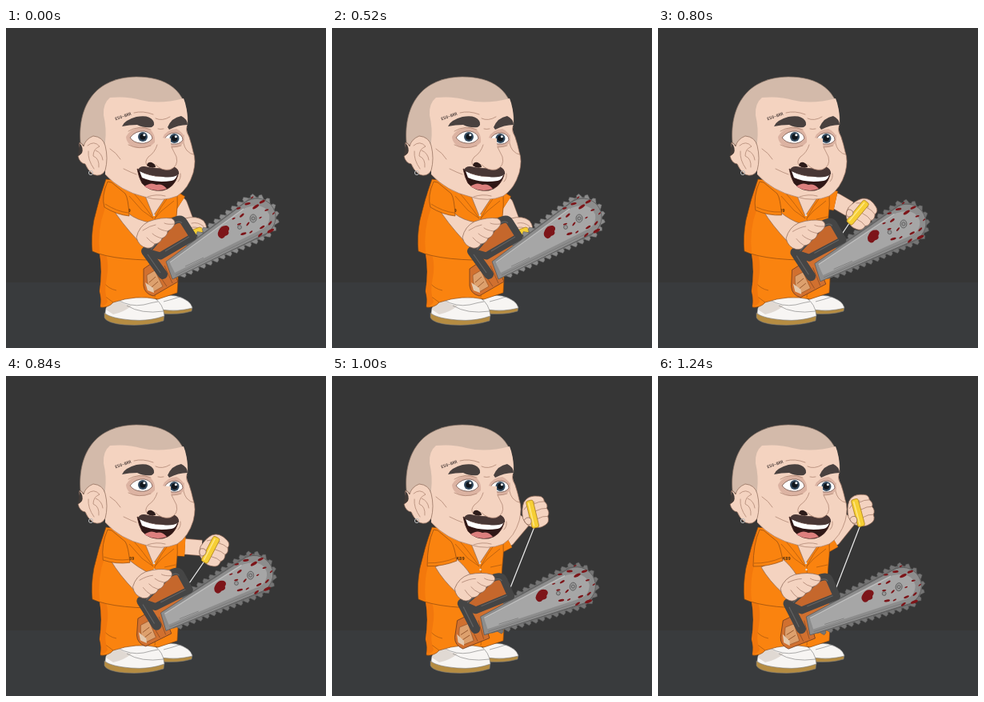
An HTML page that plays this animation: 400 by 400 pixels, repeating every 1280 ms.

```html
<!DOCTYPE html>
<html lang="en">
<head>
<meta charset="utf-8">
<title>Chainsaw pull start</title>
<style>
html, body { margin: 0; width: 100%; height: 100%; overflow: hidden; background: #363636; }
svg { display: block; width: 100vw; height: 100vh; }
text { font-family: "DejaVu Sans Mono", monospace; font-weight: bold; }
.skin { fill: #f4d3c0; stroke: #8a6655; stroke-width: .7; }
.cloth { fill: #fa830f; stroke: #8f4a10; stroke-width: .7; }
.fold { fill: none; stroke: #a8570f; stroke-width: .7; }
.crease { fill: none; stroke: #a67d6b; stroke-width: .7; stroke-linecap: round; }
.dark { fill: none; stroke: #454545; stroke-linejoin: round; stroke-linecap: round; }
.line { fill: none; stroke-linejoin: round; }
</style>
</head>
<body>
<svg viewBox="0 0 400 400" preserveAspectRatio="none">
  <rect width="400" height="400" fill="#363636"/>
  <rect y="318" width="400" height="82" fill="#393b3d"/>

  <!-- far shoe, near shoe, trousers -->
  <g stroke="#777" stroke-width=".6">
    <path d="M184 347 Q206 354 233 349 L232 354 Q216 359 194 357Z" fill="#b58c42"/>
    <path d="M186 341 Q198 332 213 335 Q231 340 233 350 Q215 355 193 352Z" fill="#f7f5f3"/>
    <path d="M197 342 Q209 339 217 336" fill="none"/>
    <path d="M123 356 Q150 367 198 358 L197 366 Q176 373 148 371 Q126 369 123 362Z" fill="#b58c42"/>
    <path d="M124 357 Q123 345 139 338 Q163 330 185 337 Q197 345 198 360 Q179 367 156 365 Q132 363 124 357Z" fill="#f7f5f3"/>
    <path d="M125 352 Q126 345 139 339 Q146 346 157 347 Q148 355 134 358Z" fill="#e0d9d3" stroke="none"/>
    <path d="M140 340 Q155 349 172 346 Q183 343 190 342 M151 347 Q169 358 197 354" fill="none"/>
  </g>
  <path class="cloth" d="M117 280 Q121 304 117 329 Q120 339 118 349 Q128 350 134 343 Q163 333 190 339 L214 331 Q217 300 211 270Z"/>
  <path class="fold" d="M119 332 Q130 340 134 343 M122 318 Q128 326 138 328 M186 337 Q188 322 183 306"/>
  <path d="M117 282 Q121 304 117 329 Q120 339 118 348 Q125 347 127 342 Q122 330 126 312 Q129 296 125 283Z" fill="#f1770d"/>

  <!-- far arm -->
  <path class="line arm" stroke="#8a6655" stroke-width="20.4"/>
  <path class="line arm" stroke="#f4d3c0" stroke-width="19"/>
  <path class="line upper" stroke="#8f4a10" stroke-width="25.4"/>
  <path class="line upper" stroke="#fa830f" stroke-width="24"/>

  <!-- torso -->
  <path class="cloth" d="M125 189 Q116 214 110 240 Q106 262 108 279 Q136 292 213 290 Q210 262 213 236 Q215 220 214 208 L180 196Z"/>
  <path d="M124 194 Q116 216 111 240 Q107 262 109 278 L117 281 Q114 252 123 228Z" fill="#f3780c"/>
  <path class="skin" d="M172 205 L184 235 L200 211Z"/>
  <path class="fold" d="M160 207 Q170 218 184 238 L170 228 L154 210 M186 238 Q194 222 203 211 M210 216 L194 229 L186 238 Q188 262 186 288 M198 239 L212 236"/>
  <circle cx="185" cy="234" r="1.3" fill="#ddd"/><circle cx="185.5" cy="242" r="1.2" fill="#ddd"/>
  <text id="badge" x="156" y="230" font-size="5.5" fill="#51300f">K89</text>

  <line id="cord" stroke="#eee" stroke-width="1.2"/>
  <g id="restHand">
    <path class="skin" d="M224 238 Q238 234 247 241 Q253 249 249 254 Q240 260 229 257 Q222 250 224 238Z"/>
    <path class="crease" d="M232 244 Q240 242 247 248 M230 250 Q238 247 243 252"/>
    <path d="M215 259 L242 249 Q247 250 246 255 L218 266Z" fill="#f6cf35" stroke="#a87a14" stroke-width=".7"/>
  </g>

  <g id="saw">
    <path d="M172 301 L191 288 L236 261 L243 269 L203 291 L215 317 L184 335 Q173 332 172 322Z" fill="#d1702f" stroke="#703b1e" stroke-width=".8"/>
    <path d="M176 279 L207 243 L222 242 L234 261 L193 285Z" fill="#c5672c"/>
    <path d="M176 309 L186 303 L196 323 L184 330 Q176 326 176 309Z" fill="#dda06d" stroke="#8b4c24" stroke-width=".6"/>
    <path d="M179 318 L187 311 M182 324 L190 317 M186 301 L201 323 M198 297 L208 319" fill="none" stroke="#8b4c24" stroke-width=".8"/>
    <path d="M174 318 L184 325 L185 331 L177 328Z" fill="#e4c9ae"/>
    <path id="chain" class="line" d="M226 272 L302 215 A24.5 24.5 0 0 1 325 258 L216 309" stroke="#707070" stroke-width="4"/>
    <path id="teeth" stroke="#5a5a5a" stroke-width=".5"/>
    <path d="M200 292 L302 216 A23.5 23.5 0 0 1 325 257 L208 314Z" fill="#8d8d8d" stroke="#5a5a5a" stroke-width=".8"/>
    <path d="M205 294 L299 225 Q322 216 329 233 Q331 246 319 252 L211 306Z" fill="#a6a6a6"/>
    <path d="M212 309 L318 257 M224 298 L247 287" fill="none" stroke="#747474" stroke-width=".7"/>
    <path d="M205 293 L297 226" stroke="#bfbfbf" stroke-width="1.4"/>
    <g fill="#999" stroke="#5d5d5d" stroke-width=".9">
      <ellipse cx="309" cy="238" rx="4" ry="5"/><circle cx="309" cy="238" r="2"/><circle cx="292" cy="249" r="2.4"/>
    </g>
    <g id="blood" fill="#7d1519">
      <path d="M266 253 Q269 246 276 247 Q281 249 278 254 Q280 258 274 260 Q271 265 267 262 Q263 259 266 253Z"/>
    </g>
    <path class="dark" stroke-width="12" d="M175 279 L196 308"/>
    <path class="dark" stroke-width="9" d="M176 279 L207 243 Q218 236 222 242 L234 261 L193 285 L179 281"/>
    <path d="M181 277 L210 244 Q217 240 220 244 M199 279 L229 261 M177 283 L193 306" fill="none" stroke="#626262" stroke-width="1.2"/>
  </g>

  <path id="forearm" class="skin"/>
  <g id="grip">
    <path class="skin" d="M163 262 Q166 248 178 242 Q194 236 207 238 Q213 241 210 247 Q207 252 202 254 Q202 260 195 263 Q193 269 186 270 Q183 276 176 275 Q166 273 163 262Z"/>
    <path class="crease" d="M210 245 Q202 246 198 244 M202 254 Q194 253 190 250 M195 263 Q187 261 183 257 M186 270 Q180 267 176 262 M171 253 Q180 247 187 246"/>
  </g>
  <path id="sleeve" class="cloth"/>
  <path id="hem" class="fold"/>

  <g id="fist">
    <path class="skin" d="M-13 2 Q-12 -10 -7 -17 Q0 -25 13 -20 Q19 -18 18 -12 Q22 -7 19 -3 Q22 3 18 7 Q19 15 12 17 Q4 20 -1 16 Q-11 15 -13 2Z"/>
    <path class="crease" d="M4 -12 Q12 -14 18 -12 M5 -3 Q13 -5 19 -3 M5 7 Q12 5 18 7 M-9 -8 Q-2 -15 6 -14"/>
    <rect x="-4.5" y="-17.5" width="9" height="35" rx="2.5" fill="#f6cf35" stroke="#a87a14" stroke-width=".7"/>
    <path d="M-1.5 -15 V15" stroke="#ffe685" stroke-width="1.6"/>
    <path class="skin" d="M-12 5 Q-8 1 -4 4 Q-2 9 -6 12 Q-11 12 -12 5Z"/>
  </g>

  <!-- head -->
  <path d="M93 143 C90 105 105 62 163 61 C198 61 228 76 227 120 L205 175 L122 170Z" fill="#d3baaa" stroke="#8a7468" stroke-width=".7"/>
  <path d="M124 142 Q126 126 122 109 Q121 94 130 87 Q152 85 168 90 Q192 96 222 88 Q227 100 227 119 Q224 126 228 134 Q232 145 234 155 Q238 165 234 181 Q228 201 214 210 Q195 218 173 211 Q143 204 124 183Z" fill="#f4d3c0"/>
  <path class="crease" d="M226 124 Q224 129 229 136 Q232 146 234 155 Q238 165 234 181 Q228 201 214 210 Q195 218 173 211 Q143 204 124 183 M222 134 Q220 145 226 153 Q231 158 234 158 M147 176 Q157 181 163 183 M130 151 Q138 156 143 164 M215 192 Q219 188 218 182 M177 211 Q188 207 199 210"/>
  <path class="skin" d="M92 143 Q96 145 97 148 Q99 139 109 135 Q121 136 124 147 Q128 163 124 178 Q119 187 109 183 Q102 178 99 170 Q92 169 90 160 Q96 157 95 152 Q90 150 92 143Z"/>
  <path class="crease" d="M102 147 Q110 140 117 148 Q109 151 109 160 Q117 163 116 174 M103 154 Q102 165 110 176 M112 153 Q120 156 121 165"/>
  <path d="M92 144 Q97 149 95 156 L90 160Z" fill="#413a37"/>
  <circle cx="106" cy="181" r="2.6" fill="none" stroke="#bbb" stroke-width="1"/>
  <text x="137" y="115.5" font-size="5" fill="#5a4a45" transform="rotate(-19 137 115.5)">ESO-BRR</text>

  <g fill="#dcb3a2">
    <path d="M150 136 Q157 123 175 124 Q187 129 186 143 Q179 151 164 150 Q151 147 150 136Z"/>
    <path d="M196 137 Q200 127 213 126 Q223 130 223 141 Q219 150 207 149 Q196 146 196 137Z"/>
  </g>
  <g fill="#fff" stroke="#735248" stroke-width=".8">
    <path d="M155 137 Q162 128 173 129 Q182 131 183 138 Q178 145 168 144 Q159 143 155 137Z"/>
    <path d="M198 139 Q202 131 212 131 Q221 133 221 140 Q217 146 208 145 Q200 144 198 139Z"/>
  </g>
  <g id="eyes"></g>
  <path class="crease" d="M153 146 Q166 153 181 147 M199 147 Q208 151 219 147 M153 129 Q165 121 181 127 M160 106 Q171 103 184 108 M187 113 Q195 117 205 111 M190 126 Q193 127 197 126"/>
  <g fill="#49413f">
    <path d="M145 123 Q148 115 163 111 Q179 108 184 116 Q187 121 182 124 Q172 125 164 121 Q154 121 145 123Z"/>
    <path d="M202 124 Q207 112 219 110 Q227 114 227 121 Q215 121 204 127Z"/>
  </g>

  <path d="M164 176 Q187 192 215 184 Q210 200 196 203 Q179 205 170 194 Q166 187 164 176Z" fill="#2f1716" stroke="#442822" stroke-width=".8"/>
  <path d="M173 198 Q181 192 188 196 Q195 194 201 201 Q186 206 173 198Z" fill="#dc7f7d"/>
  <path d="M167 179 Q187 190 214 184 Q212 190 207 191 Q185 194 170 187Z" fill="#fff"/>
  <path d="M165 178 Q167 171 178 174 Q194 177 209 173 Q217 176 216 183 Q208 188 196 186 Q180 185 165 178Z" fill="#483735"/>
  <path d="M191 137 Q188 153 178 160 Q172 167 177 172 Q183 176 190 174 Q203 181 210 174 Q217 166 211 157 Q205 150 206 138Z" fill="#f4d3c0"/>
  <path class="crease" d="M189 146 Q186 156 178 161 Q172 168 177 172 M187 171 Q195 179 205 177 Q216 173 213 161 Q210 155 207 149"/>
  <path d="M176 172 Q177 167 182 168 Q187 170 187 174 Q181 176 176 172Z" fill="#2d1c1a"/>
</svg>
<script>
const LOOP = 1280, STEP = 40, PITCH = 9;
const PULL_START = 680, PULL_TIME = 350;
const $ = id => document.getElementById(id);
const set = (id, attrs) => { for (const k in attrs) $(id).setAttribute(k, attrs[k]); };
const setAll = (cls, d) => document.querySelectorAll("." + cls).forEach(el => el.setAttribute("d", d));
const add = (id, markup) => $(id).insertAdjacentHTML("beforeend", markup);

const mix = (a, b, k) => a + (b - a) * k;
const smooth = u => u * u * (3 - 2 * u);
const pullAt = t => smooth(Math.min(1, Math.max(0, (t - PULL_START) / PULL_TIME)));

function turn(x, y, deg) {
  const r = deg * Math.PI / 180, c = Math.cos(r), s = Math.sin(r);
  return [x * c - y * s, x * s + y * c];
}

let seed = 11;
const random = () => (seed = seed * 16807 % 2147483647) / 2147483647;

// splashes spiral out from the tip of the bar
for (let i = 0; i < 18; i++) {
  const [x, y] = turn(7 + 20 * Math.sqrt(i / 18), 0, i * 137.5);
  const size = 2 + 3 * random(), angle = -30 + 50 * (random() - .5);
  add("blood", `<ellipse rx="${size}" ry="${size * .38}" transform="translate(${311 + x} ${237 + y}) rotate(${angle})"/>`);
}

const eye = (x, y) => add("eyes",
  `<circle cx="${x}" cy="${y}" r="6" fill="#344b60"/><circle cx="${x}" cy="${y}" r="3.8" fill="#11161c"/>
   <circle cx="${x + 1.8}" cy="${y - 2.2}" r="1.5" fill="#fff"/>`);
eye(171, 136);
eye(210.5, 138);

const chain = $("chain"), chainLength = chain.getTotalLength();

function teethPath(shift) {
  let d = "";
  for (let s = 4 + shift; s < chainLength - 4; s += PITCH) {
    const p = chain.getPointAtLength(s), q = chain.getPointAtLength(s + .5);
    const ux = (q.x - p.x) * 2, uy = (q.y - p.y) * 2;
    const at = (along, out) => `${p.x + ux * along + uy * out} ${p.y + uy * along - ux * out}`;
    d += `M${at(-4, 0)}L${at(-4, 4)}L${at(-1, 6)}L${at(2, 3)}L${at(4, 0)}Z`;
  }
  return d;
}

function draw(t) {
  const k = pullAt(t), arc = Math.sin(Math.PI * k), resting = k < .1;
  const dx = -10 * k, dy = 20 * k, rot = 8.5 * k;
  const onSaw = (x, y) => {
    const [a, b] = turn(x - 272, y - 255, rot);
    return [a + 272 + dx, b + 255 + dy];
  };
  const move = `translate(${dx} ${dy}) rotate(${rot} 272 255)`;
  set("saw", { transform: move });
  set("grip", { transform: move });
  set("badge", { transform: `translate(${-10 * (1 - k)} 0)` });
  set("teeth", {
    d: teethPath(Math.max(0, t - PULL_START) / STEP * 3.7 % PITCH),
    fill: resting ? "#8b8b8b" : "#757575"
  });

  // near sleeve and forearm
  const ax = mix(123, 119, k), ay = mix(224, 238, k);
  const bx = mix(154, 156, k), by = mix(235, 231, k);
  const mx = (ax + bx) / 2, my = (ay + by) / 2;
  set("forearm", {
    d: `M${ax + 10} ${ay + 1}Q${ax + 20} ${ay + 18} ${onSaw(165, 266)}L${onSaw(181, 243)}Q${bx + 10} ${by + 6} ${bx - 2} ${by - 4}Z`
  });
  set("sleeve", { d: `M127 192Q119 210 ${ax} ${ay}Q${mx} ${my + 4} ${bx} ${by}Q153 213 149 207L132 193Z` });
  set("hem", { d: `M${ax + 1} ${ay - 4}Q${mx} ${my} ${bx - 1} ${by - 4}` });

  // far arm and pull handle
  const hx = mix(234, 250, k) + 15 * arc, hy = mix(253, 171, k), tilt = mix(60, -15, k);
  const [wx, wy] = turn(-11, 3, tilt), [cx, cy] = turn(0, 14, tilt);
  const cuff = [mix(217, 219, k) + 6 * arc, mix(221, 203, k)];
  setAll("arm", `M205 213L${cuff}L${hx + wx} ${hy + wy}`);
  setAll("upper", `M203 212L${cuff}`);
  const [ex, ey] = onSaw(230, 258), pulling = resting ? "hidden" : "visible";
  set("fist", { transform: `translate(${hx} ${hy}) rotate(${tilt})`, visibility: pulling });
  set("cord", { x1: hx + cx, y1: hy + cy, x2: ex, y2: ey, visibility: pulling });
  set("restHand", { visibility: resting ? "visible" : "hidden" });
}

const start = performance.now();
function tick() {
  const t = (performance.now() - start) % LOOP;
  draw(Math.floor(t / STEP) * STEP);
  requestAnimationFrame(tick);
}
tick();
</script>
</body>
</html>
```
